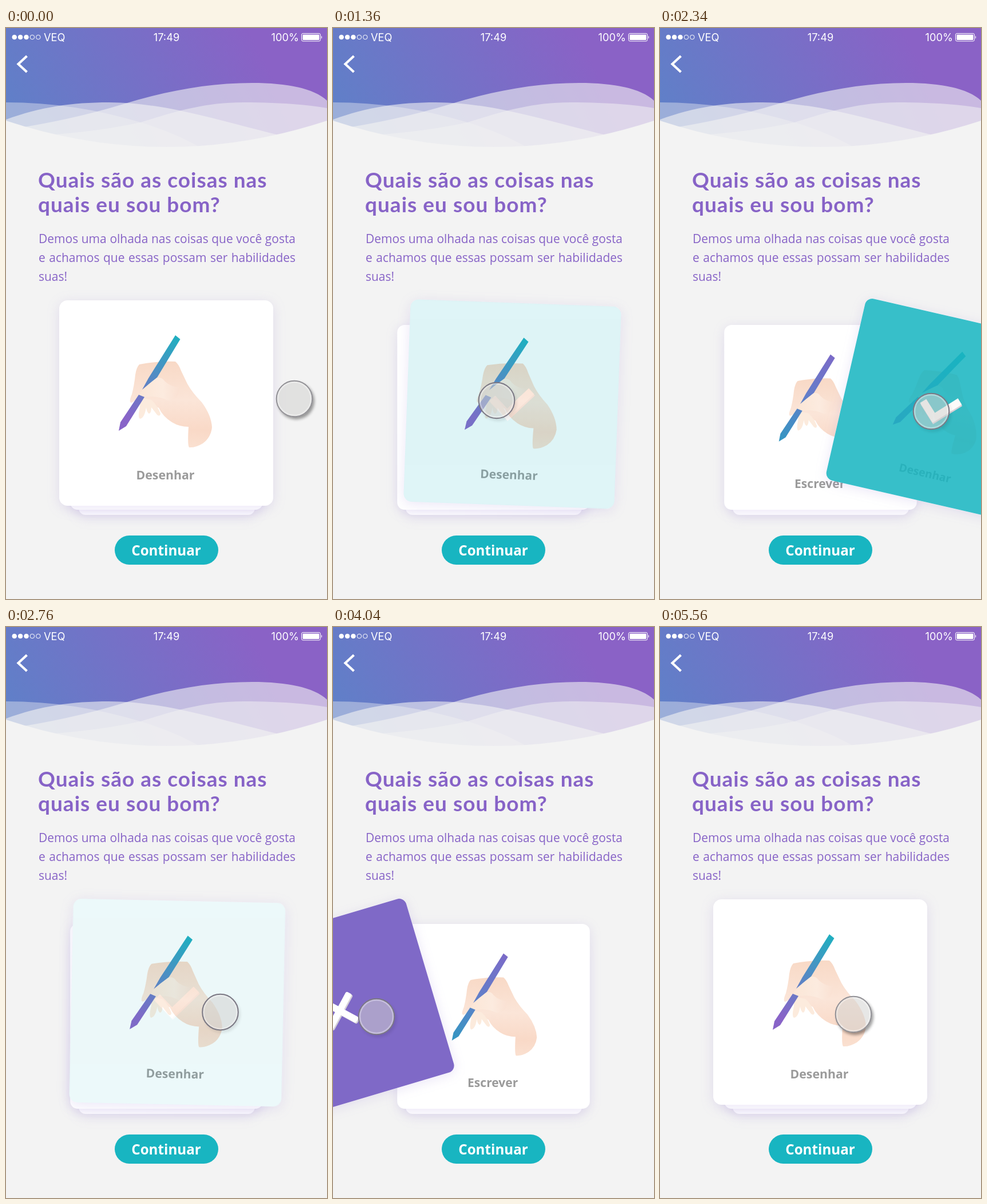
Write an HTML page that moves like this. It is 561 by 998 pixels and loops after 5580 ms.

```html
<!DOCTYPE html>
<html lang="pt">
<head>
<meta charset="utf-8">
<title>Habilidades</title>
<style>
  html, body { margin: 0; width: 100%; height: 100%; overflow: hidden; background: #f3f3f3; }
  #stage { position: relative; width: 561px; height: 998px; overflow: hidden; }
  svg { position: absolute; inset: 0; display: block; }
  text { font-family: "Open Sans", sans-serif; }
  .status text { font: 400 18.300px Inter, sans-serif; fill: #fff; }
  .title { font: 700 37px Lato, sans-serif; letter-spacing: 1px; fill: #8763c7; }
  .label { font-weight: 700; fill: #9b9b9b; text-anchor: middle; }
  .paper { fill: #fff; filter: drop-shadow(0 4px 11px rgba(120, 90, 200, .15)); }
  .intro { position: absolute; left: 57px; top: 352px; width: 449px; margin: 0;
    font: 400 20.94px/33px "Open Sans", sans-serif; color: #8763c7; }
  .intro span { display: block; white-space: nowrap; text-align: justify; text-align-last: justify; }
  .intro span:last-child { text-align-last: left; }
</style>
</head>
<body>
<div id="stage">
<svg width="561" height="998" viewBox="0 0 561 998">
  <defs>
    <linearGradient id="sky" gradientUnits="userSpaceOnUse" x1="0" y1="150" x2="400" y2="-50">
      <stop stop-color="#5f80c8"/><stop offset="1" stop-color="#8a62c6"/>
    </linearGradient>
    <linearGradient id="tealPen" gradientUnits="userSpaceOnUse" x1="300" y1="540" x2="212" y2="680">
      <stop stop-color="#20afc0"/><stop offset="1" stop-color="#8864c8"/>
    </linearGradient>
    <linearGradient id="violetPen" gradientUnits="userSpaceOnUse" x1="300" y1="540" x2="198" y2="704">
      <stop stop-color="#7b6bc8"/><stop offset=".5" stop-color="#617fc9"/><stop offset="1" stop-color="#3397c2"/>
    </linearGradient>
    <linearGradient id="skin" x1="0" y1="0" x2="0" y2="1">
      <stop stop-color="#f8d9c6"/><stop offset=".45" stop-color="#fbe5d8"/><stop offset=".8" stop-color="#f9d9c7"/><stop offset="1" stop-color="#fae0d0"/>
    </linearGradient>
    <linearGradient id="fingers" x1="0" y1="0" x2="1" y2="0">
      <stop stop-color="#fbe6d6"/><stop offset=".6" stop-color="#fcebdf"/><stop offset="1" stop-color="#fae1d3"/>
    </linearGradient>
    <g id="fist">
      <path fill="url(#skin)" d="M233 588Q265 582 296 583Q302 588 306 599L317 622Q326 638 342 654Q359 677 360 698Q358 716 344 726Q331 734 320 733Q317 730 319 697Q303 697 290 689Q274 679 267 664L247 655L232 648L219 655Q214 654 220 640Q224 625 226 606Q228 593 233 588Z"/>
      <path fill="#fcebdd" d="M234 646L254 650Q265 660 270 674Q269 680 264 676L254 663Q254 673 250 674Q246 672 245 663Q242 682 234 683Q230 680 234 663Z"/>
    </g>
    <path id="penTop" d="M296 537L304.500 544L264 611L238 632L249 612Z"/>
    <path id="penTip" d="M232 641L242 645L210 696L197 704L200 689Z"/>
    <path id="thumb" fill="url(#fingers)" d="M232 643Q238 632 250 622L264 611Q273 610 277 617Q287 627 302 628Q304 650 283 651Q262 641 241 646Z"/>
    <rect id="bar" x="-40" y="-6.500" width="80" height="13" rx="3.500"/>
    <g id="cross"><use href="#bar" transform="rotate(45)"/><use href="#bar" transform="rotate(-45)"/></g>
    <path id="check" d="M-36-9L-9 18L33-24" fill="none" stroke-width="14"/>
    <clipPath id="outside"><path clip-rule="evenodd" d="M-60-60H60V60H-60ZM32 0A32 32 0 1 0-32 0A32 32 0 1 0 32 0Z"/></clipPath>
    <filter id="soft" x="-30%" y="-30%" width="160%" height="160%"><feGaussianBlur stdDeviation="2.500"/></filter>
  </defs>

  <rect width="561" height="998" fill="#f3f3f3"/>
  <rect width="561" height="215" fill="url(#sky)"/>
  <g fill="#f3f3f3">
    <path opacity=".4" d="M0 130Q120 130 235 165Q300 184 350 215H0Z"/>
    <path opacity=".6" d="M0 178Q110 162 205 133C280 110 355 96 430 96C495 96 540 107 561 127V215H0Z"/>
    <path opacity=".6" d="M0 160C60 138 115 130 180 130C275 130 370 161 472 186L561 205V215H0Z"/>
    <path opacity=".5" d="M0 191Q140 186 235 165C285 150 340 130 415 130C470 130 520 133 561 140V215H0Z"/>
    <path d="M0 162Q280 254 561 162V230H0Z"/>
  </g>

  <g class="status">
    <g id="signal" stroke="#fff"></g>
    <text x="66" y="22.500">VEQ</text>
    <text x="280.500" y="22.500" text-anchor="middle">17:49</text>
    <text x="512" y="22.500" text-anchor="end">100%</text>
    <rect x="516.500" y="9.500" width="33" height="13.500" rx="2.500" fill="none" stroke="#fff"/>
    <rect x="518.500" y="11.500" width="29" height="9.500" rx="1" fill="#fff"/>
    <path d="M551 13.500Q553.500 16 551 19Z" fill="#fff"/>
  </g>
  <path d="M36.500 49L21.500 63L36.500 77" fill="none" stroke="#fff" stroke-width="4.200"/>

  <text class="title" x="56" y="279">Quais são as coisas nas</text>
  <text class="title" x="56" y="322">quais eu sou bom?</text>

  <rect x="190" y="887" width="181" height="51" rx="25.500" fill="#18b5c1"/>
  <text x="280" y="922" text-anchor="middle" font-size="24.200" font-weight="700" fill="#fff">Continuar</text>

  <rect class="paper" x="127" y="555" width="308" height="296" rx="12"/>
  <g id="next" transform="translate(280.500 680.500) scale(.9)"></g>
  <g id="card"></g>
  <g id="pointer">
    <g id="lift" clip-path="url(#outside)"><circle cx="3" cy="4" r="32" fill="#000" opacity=".38" filter="url(#soft)"/></g>
    <circle r="31.500" fill="#d2d1d0" fill-opacity=".53"/>
    <circle r="29" fill="none" stroke="#fff" stroke-opacity=".32" stroke-width="2.500"/>
    <circle id="ring" r="31.300" fill="none" stroke-width="2"/>
  </g>
</svg>
<p class="intro"><span>Demos uma olhada nas coisas que você gosta</span><span>e achamos que essas possam ser habilidades</span><span>suas!</span></p>
</div>
<script>
const $ = id => document.getElementById(id);
const LOOP = 5580, PRESS = 1120, RELEASE = 5240;

const cardFace = (pen, label, size, y, placement = '') => `
  <rect class="paper" x="-187" y="-179.5" width="374" height="359" rx="14.500"/>
  <g transform="${placement} translate(-280 -655.5)">
    <use href="#fist"/>
    <use href="#penTop" fill="url(#${pen})"/>
    <use href="#thumb"/>
    <use href="#penTip" fill="url(#${pen})"/>
  </g>
  <text class="label" x="-1.500" y="${y}" font-size="${size}">${label}</text>`;

const verdict = (id, color, mark) => `
  <g id="${id}">
    <rect x="-187" y="-179.5" width="374" height="359" rx="14.500" fill="${color}"/>
    <use href="#${mark}" x="1.500" y="2.500" fill="#d5d0d8" stroke="#d5d0d8" stroke-width="0"/>
    <use href="#${mark}" fill="#fff" stroke="#fff" stroke-width="0"/>
  </g>`;

$('signal').innerHTML = [0, 1, 2, 3, 4].map(i =>
  `<circle cx="${14.7 + i * 10.4}" cy="16" r="3.800" fill="${i < 3 ? '#fff' : 'none'}"/>`).join('');
$('next').innerHTML = cardFace('violetPen', 'Escrever', 23.4, 137, 'translate(3.2 -2.2) scale(1.013)');
$('card').innerHTML = cardFace('tealPen', 'Desenhar', 21.3, 133)
  + verdict('yes', '#18b5c1', 'check') + verdict('no', '#7f69c7', 'cross');

// Monotone cubic curve through [time, value] pairs.
function curve(points) {
  const secant = points.slice(1).map(([t, v], i) => (v - points[i][1]) / (t - points[i][0]));
  const slope = points.map((_, i) => {
    const a = secant[i - 1] || 0, b = secant[i] || 0;
    return a * b > 0 ? 2 * a * b / (a + b) : 0;
  });
  return time => {
    const last = points.length - 1;
    if (time <= points[0][0]) return points[0][1];
    if (time >= points[last][0]) return points[last][1];
    const i = points.findIndex(p => p[0] > time) - 1;
    const [t0, v0] = points[i], [t1, v1] = points[i + 1];
    const h = t1 - t0, u = (time - t0) / h, w = 1 - u;
    return v0 * w * w * (1 + 2 * u) + v1 * u * u * (3 - 2 * u)
      + h * u * w * (slope[i] * w - slope[i + 1] * u);
  };
}

const drag = curve([[1120, 0], [1360, 33.5], [1660, 138], [1980, 228], [2080, 230], [2340, 210],
  [2780, 13], [3360, -114], [3900, -248], [4040, -268.5], [4140, -273], [4300, -273],
  [4800, -99], [5100, -50], [5240, -50], [5540, 0]]);
const pointerX = curve([[400, 504], [880, 232], [1120, 232], [1360, 286], [1660, 390], [1980, 488],
  [2080, 490], [2340, 474], [2780, 370], [3360, 253], [3900, 94], [4040, 76], [4140, 73],
  [4300, 73], [4800, 279], [5100, 338]]);
const pointerY = curve([[400, 648], [880, 651], [1360, 651], [2340, 670], [3360, 676.5],
  [4040, 681], [4800, 681], [5100, 677]]);

function draw(time) {
  const d = drag(time), far = Math.abs(d);
  const tint = Math.min(1, far / 243);
  const pressed = time >= PRESS && time < RELEASE;
  $('card').setAttribute('transform',
    `translate(${280 + d} ${655.5 + far * .056}) rotate(${d / 16.2}) scale(${1 - far * .00044})`);
  $('yes').setAttribute('opacity', d > 0 ? tint : 0);
  $('no').setAttribute('opacity', d < 0 ? tint : 0);
  $('pointer').setAttribute('transform', `translate(${pointerX(time)} ${pointerY(time)})`);
  $('lift').setAttribute('opacity', pressed ? .25 : 1);
  $('ring').setAttribute('stroke', pressed ? '#7b7884' : '#929196');
}

const start = performance.now();
function tick() {
  const elapsed = (performance.now() - start) % LOOP;
  draw(Math.floor(elapsed / 20) * 20);
  requestAnimationFrame(tick);
}
tick();
</script>
</body>
</html>
```
